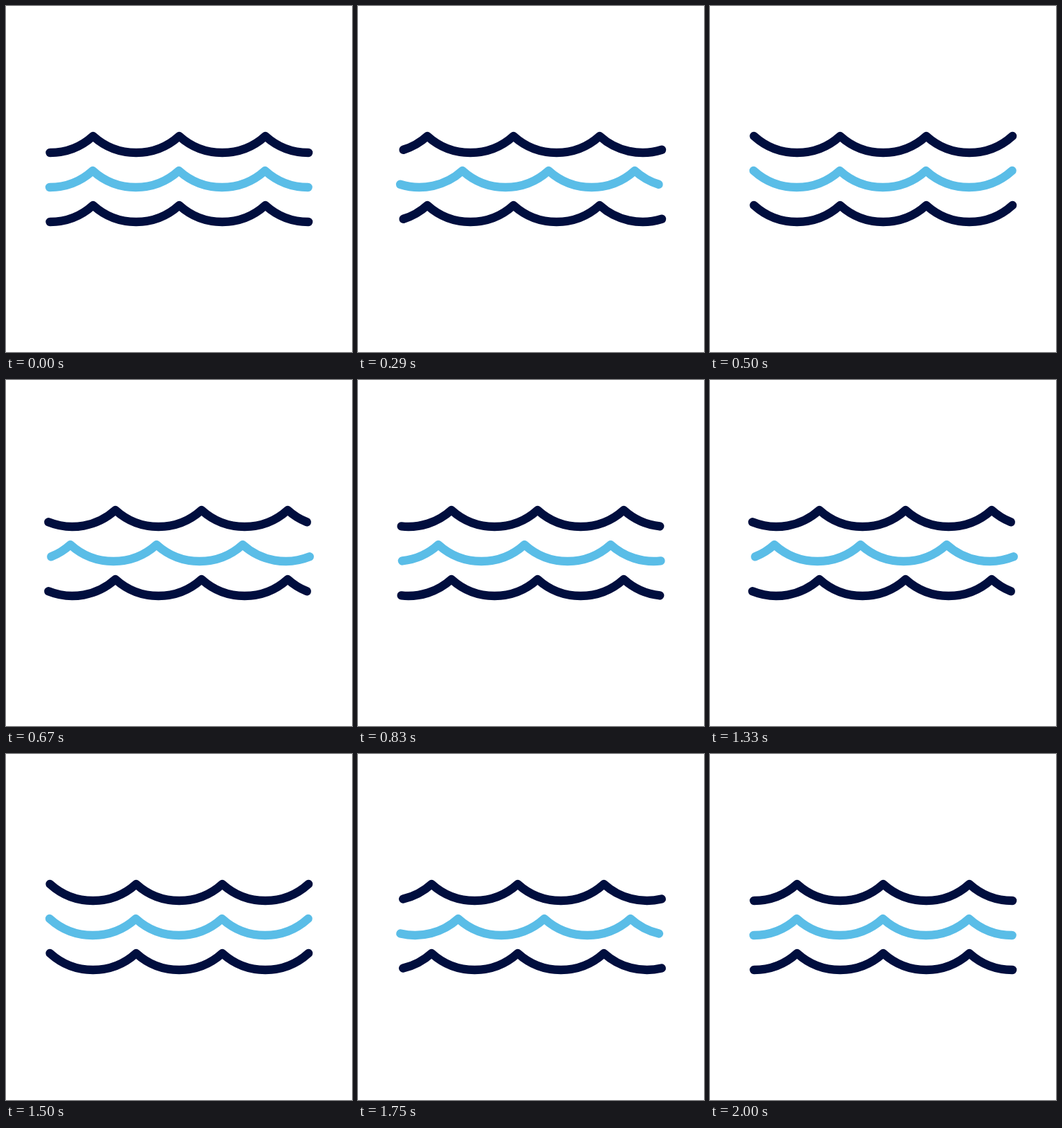
Write an HTML page with a canvas that moves like this. It is 500 by 500 pixels and loops after 2.04 s.

```html
<!DOCTYPE html>
<html lang="en">
<head>
<meta charset="utf-8">
<title>Waves</title>
<style>
html, body { margin: 0; width: 100%; height: 100%; overflow: hidden; background: #fff; }
canvas { display: block; }
</style>
</head>
<body>
<canvas id="stage" width="500" height="500"></canvas>
<script>
const ctx = document.getElementById('stage').getContext('2d');
const LOOP = 2040, FPS = 24;
const PERIOD = 124.5, HEIGHT = 24, COUNT = 3;
const HALF = PERIOD / 2;
const RADIUS = (HALF * HALF + HEIGHT * HEIGHT) / (2 * HEIGHT);
const SWEEP = 2 * Math.asin(HALF / RADIUS);
const NAVY = '#000e3e', BLUE = '#5abde7';

ctx.lineWidth = 12.4;
ctx.lineCap = ctx.lineJoin = 'round';

// A row of hanging arcs, trimmed by arc length to `COUNT` periods from `phase`.
function wave(centerX, troughY, phase, color) {
  const left = centerX - COUNT * HALF;
  ctx.beginPath();
  for (let i = 0; i <= COUNT + 1; i++) {
    const from = Math.max(phase, i - 0.5), to = Math.min(phase + COUNT, i + 0.5);
    if (from >= to) continue;
    const angle = s => Math.PI / 2 - (s - i) * SWEEP;
    ctx.arc(left + (i - phase) * PERIOD, troughY - RADIUS, RADIUS, angle(from), angle(to), true);
  }
  ctx.strokeStyle = color;
  ctx.stroke();
}

// Motion advances in 24 steps per second, on a 10 ms clock.
function phaseAt(ms) {
  const step = Math.ceil((Math.floor(ms / 10) * 10 + 5) * FPS / 1000) - 1;
  const t = 1 - Math.abs(1 - step / FPS);
  return t * t * (3 - 2 * t);
}

const start = performance.now();

function draw() {
  const phase = phaseAt((performance.now() - start) % LOOP);
  ctx.clearRect(0, 0, 500, 500);
  wave(250.3, 212, phase, NAVY);
  wave(249.8, 262, 1 - phase, BLUE);
  wave(250.3, 312, phase, NAVY);
  requestAnimationFrame(draw);
}
draw();
</script>
</body>
</html>
```
